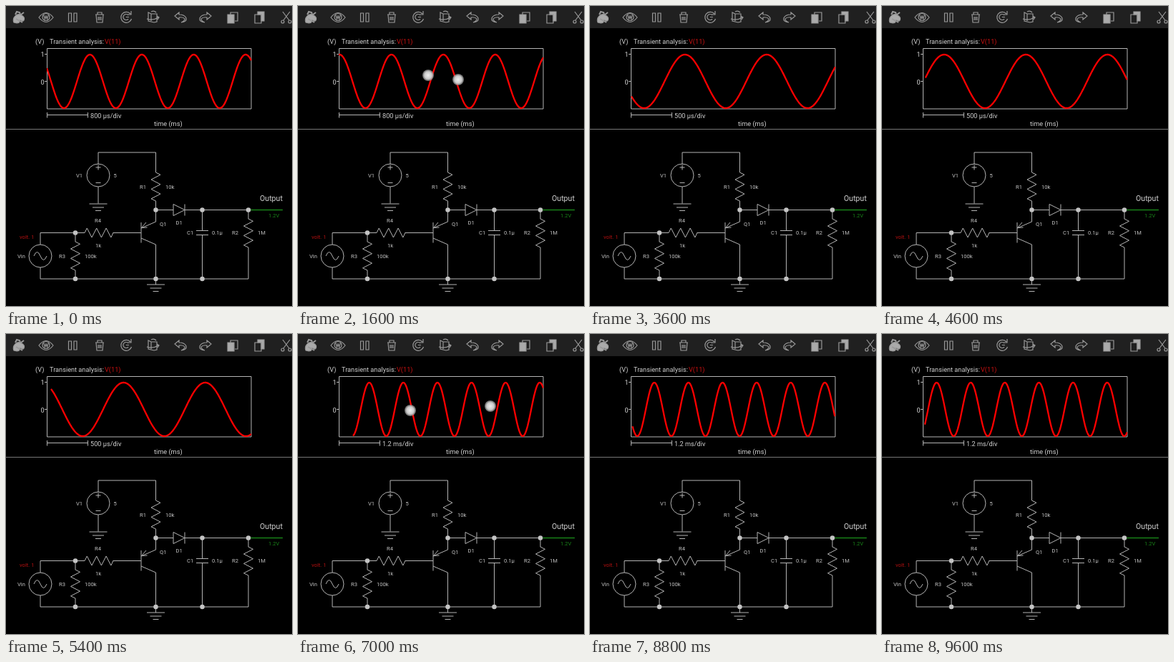
Write an HTML page that moves like this. It is 400x420 px and loops after 9800 ms.

```html
<!DOCTYPE html>
<html lang="en">
<head>
<meta charset="utf-8">
<title>Transient analysis</title>
<style>
html, body { margin: 0; width: 100%; height: 100%; overflow: hidden; background: #000; }
svg { display: block; width: 400px; height: 420px; font: 7.6px Roboto, sans-serif; }
.line { fill: none; stroke: #b4b4b4; }
.icons { fill: none; stroke: #999; stroke-width: 1.2; }
.icons .solid { fill: #aaa; }
.label { fill: #c4c4c4; }
.big { font-size: 9.2px; fill: #d0d0d0; }
</style>
</head>
<body>
<svg viewBox="0 0 400 420">
  <defs>
    <path id="resistor" d="M0 0l6.5 3.3-13 6.7 13 6.7-13 6.7 13 6.7-13 6.7 6.5 3.2"/>
    <path id="ground" d="M-12.5 0h25M-8 5h16M-4 9.5h8"/>
    <g id="pointer"><circle r="8" fill="url(#glow)"/></g>
    <radialGradient id="glow">
      <stop offset="0" stop-color="#eee"/><stop offset=".65" stop-color="#c8c8c8"/>
      <stop offset="1" stop-color="#888" stop-opacity=".7"/>
    </radialGradient>
    <clipPath id="plot"><path d="M57 59h286.5v86H57z"/></clipPath>
  </defs>

  <path fill="#202020" d="M0 0h400v31H0z"/>
  <g class="icons">
    <path class="solid" d="M11 23q-2-5 2-9t9-1q5 3 3 7-2 2-4 0-2-1-2 1 0 3-4 3z"/>
    <path d="M13 12l2-4 4 1 1 3M21 12l4-3M14 18l9 5" stroke-width="2"/>
    <path d="M46 16q10-13 20 0-10 13-20 0z"/><circle cx="56" cy="15.5" r="5"/>
    <path d="M53 13l1.5 5 1.5-4 1.5 4 1.5-5"/>
    <path d="M87.5 10h4v12h-4zM95 10h4v12h-4z"/>
    <path d="M125 12h12M126 12l1 11h8l1-11M128 12V9h6v3M129 15v5M131 15v5M133 15v5"/>
    <path d="M174 11a7.5 7.5 0 1 0 1.5 7M175 7v5h-5M171 13a4 4 0 1 0 0 5M168 15.5h4"/>
    <path d="M199 9l4 2h8v11l-4 1-8-2zM203 11v10M197 18q8 3 16-2M211 14l3 2-2 3M203 8q4-2 7 1"/>
    <path d="M242 9l-6 5 6 5v-3q6-1 8 2 0 3-5 5 8-1 7-6-2-5-10-5z"/>
    <path d="M281 9l6 5-6 5v-3q-6-1-8 2 0 3 5 5-8-1-7-6 2-5 10-5z"/>
    <path d="M314 12V9h10v12h-4"/><path class="solid" d="M310 12h9v12h-9z"/>
    <path class="solid" d="M352 8h9v13h-4V12h-5z"/><path d="M348 12h9v12h-9z"/>
    <path d="M387 8l9 12M397 8l-9 12"/><circle cx="387" cy="22" r="2"/><circle cx="397" cy="22" r="2"/>
  </g>

  <path d="M0 172.5h400" stroke="#777"/>
  <g class="big">
    <text x="41" y="53">(V)</text><text x="61" y="53">Transient analysis:</text>
    <text x="138" y="53" fill="#c81010">V(11)</text>
    <text x="48.5" y="71">1</text><text x="48.5" y="109.5">0</text>
    <text id="scale" x="118" y="156.5"></text><text x="207" y="167.5">time (ms)</text>
    <text x="355" y="273" font-size="10.6" style="font-size:10.6px">Output</text>
  </g>
  <path class="line" d="M57.5 59.5H343V144H57.5zM54 67.5h3M54 105.5h3M57.5 149v7.5M57.5 152.5H115M114.5 149v7.5"/>
  <path id="wave" clip-path="url(#plot)" fill="none" stroke="#f00" stroke-width="2.3" stroke-linejoin="round"/>

  <g class="line">
    <path d="M129 221.5V205H209.5V233M209.5 273V302L189 311M129 253V276.5"/>
    <circle cx="129" cy="237" r="16"/><path d="M125.5 226h7M129 222.5v7M125.5 247.5h7"/>
    <path d="M209.5 285.5H234M234 277.5v16l16-8zM250 277.5v16M250 285.5H339"/>
    <path d="M189 303v28.500M189 325l20.500 9V390M196 303l-6.500 7.500 8-.500"/>
    <path d="M274.500 285.500V314.500M266 314.500h17M266 320.500h17M274.500 320.500V382"/>
    <path d="M339 285.500V298M339 338V382M48 366V382H339M48 334V317.500H110M149.500 317.500H189M97 317.500V330M97 370V382"/>
    <circle cx="48" cy="350" r="16"/><path d="M39 350q4.500-11 9 0t9 0"/>
    <use href="#resistor" x="209.5" y="233"/><use href="#resistor" x="339" y="298"/>
    <use href="#resistor" x="97" y="330"/><use href="#resistor" transform="translate(110 317.500) rotate(-90)"/>
    <use href="#ground" x="129" y="277"/><use href="#ground" x="209.5" y="390"/>
  </g>
  <path d="M339 285.500H387" stroke="#188018" stroke-width="1.3"/>
  <path d="M97 317.500h0M97 382h0M209.500 285.500h0M209.500 382h0M274.500 285.500h0M274.500 382h0M339 285.500h0"
    stroke="#c4c4c4" stroke-width="6.500" stroke-linecap="round"/>
  <g class="label">
    <text x="98" y="240">V1</text><text x="150.500" y="240">5</text>
    <text x="187" y="256">R1</text><text x="223" y="256">10k</text>
    <text x="237.500" y="306">D1</text><text x="215" y="308">Q1</text>
    <text x="124" y="303">R4</text><text x="125" y="338">1k</text>
    <text x="74" y="353">R3</text><text x="110" y="353">100k</text>
    <text x="253" y="320">C1</text><text x="288" y="320">0.1µ</text>
    <text x="316" y="320">R2</text><text x="352" y="320">1M</text>
    <text x="16" y="353">Vin</text>
    <text x="19" y="326" fill="#b01010">volt. 1</text><text x="367" y="296" fill="#188018">1.2V</text>
  </g>
  <use class="touch" href="#pointer"/><use class="touch" href="#pointer"/>
</svg>
<script>
const LOOP = 9800, STEP = 200, LEFT = 57, RIGHT = 343, MIDDLE = 200;
const wave = document.getElementById('wave');
const scale = document.getElementById('scale');
const touches = document.querySelectorAll('.touch');

// Keys are [time, value, ...]
const period = [[0, 72.6], [1600, 72.6], [2600, 114.2], [6000, 114.2], [7000, 47.7], [LOOP, 47.7]];
const cycles = [[0, -.138], [1600, -.955], [3600, -1.588], [5400, -2.312], [7000, -3.105], [8000, -4.02], [9600, -4.592], [LOOP, -4.66]];
const start = [[0, 57], [1600, 57], [3600, 58], [5400, 63], [7000, 77], [8000, 59], [LOOP, 60]];
// Each gesture key holds x1, y1, x2, y2
const gestures = [
  [[1400, 182, 97, 224, 103], [1600, 182, 97, 224, 103], [2600, 169, 95, 237, 105]],
  [[6000, 82, 111, 344, 97], [7000, 157, 107, 269, 101]]
];

function at(keys, t) {
  const i = Math.max(1, keys.findIndex(k => k[0] >= t));
  const a = keys[i - 1], b = keys[i], f = (t - a[0]) / (b[0] - a[0]);
  return a.slice(1).map((v, n) => v + (b[n + 1] - v) * f);
}

function draw(t) {
  const [p] = at(period, t), [c] = at(cycles, t), [from] = at(start, t);
  const points = [];
  for (let x = from; x <= RIGHT; x++) {
    const y = 105.5 - 37.5 * Math.cos(2 * Math.PI * ((x - MIDDLE) / p - c));
    points.push(x.toFixed(1) + ' ' + y.toFixed(2));
  }
  wave.setAttribute('d', 'M' + points.join('L'));

  const micros = Math.round(572 / p) * 100;
  scale.textContent = micros < 1000 ? micros + ' µs/div' : micros / 1000 + ' ms/div';

  const gesture = gestures.find(g => t >= g[0][0] && t <= g[g.length - 1][0]);
  const spots = gesture && at(gesture, t);
  touches.forEach((touch, i) => {
    touch.style.display = spots ? '' : 'none';
    if (spots) touch.setAttribute('transform', `translate(${spots[2 * i]} ${spots[2 * i + 1]})`);
  });
}

function tick() {
  draw(Math.floor(performance.now() % LOOP / STEP) * STEP);
  requestAnimationFrame(tick);
}
tick();
</script>
</body>
</html>
```
